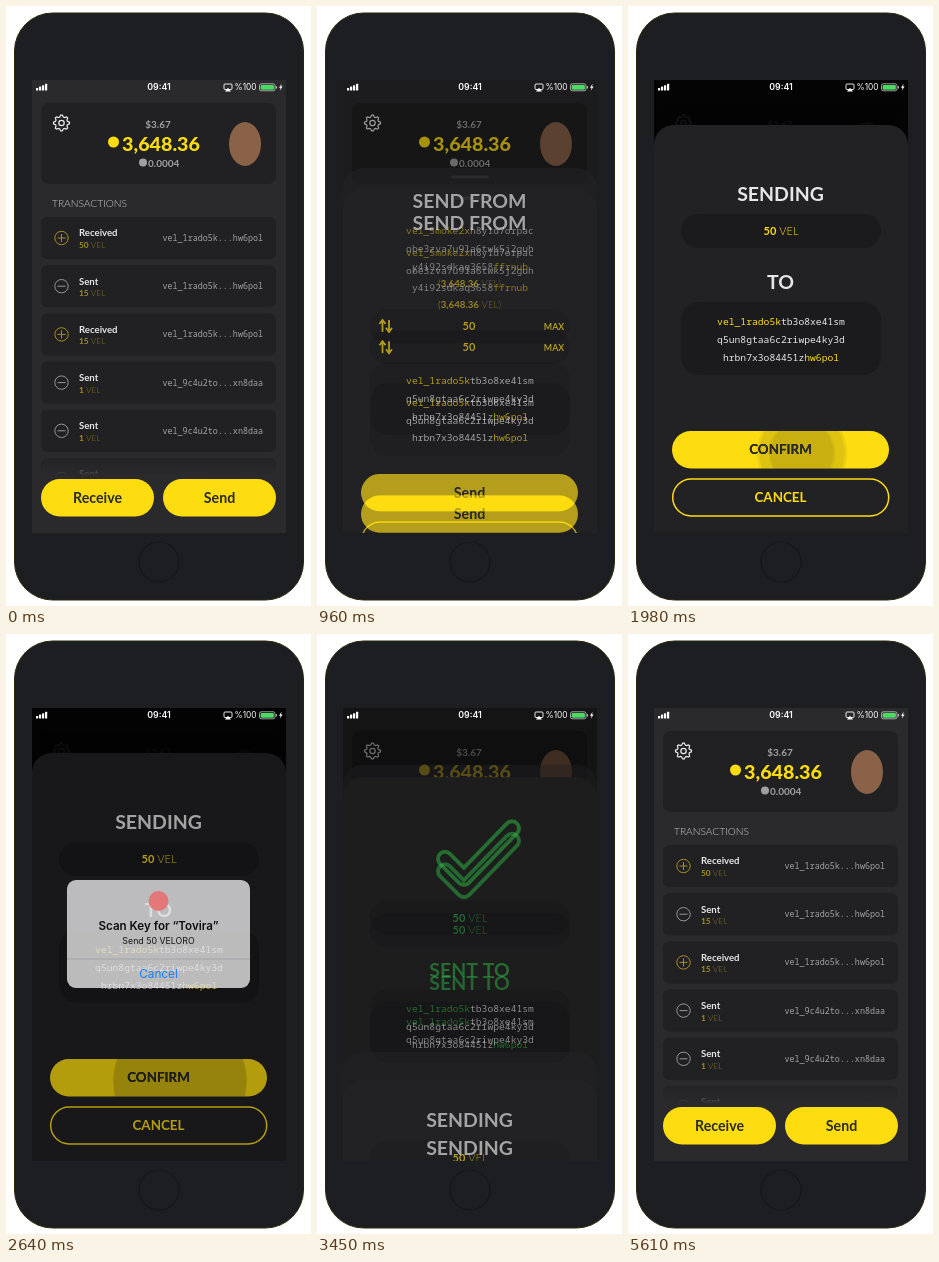
An HTML page with a canvas that plays this animation: 305x600 px, repeating every 5640 ms.

```html
<!DOCTYPE html>
<html lang="en">
<head>
<meta charset="utf-8">
<title>Wallet payment</title>
<style>
  html, body { margin: 0; width: 100%; height: 100%; overflow: hidden; background: #fff; }
  canvas { display: block; width: 305px; height: 600px; }
</style>
</head>
<body>
<canvas id="stage"></canvas>
<script>
const LOOP = 5640, STEP = 30, BLUR = 17, SLIDE = 250, FAST = 205, TRAVEL = 408;
const SEND_IN = 828, CONFIRM_IN = 1450, CONFIRM_OUT = 3250;
const SENT_IN = 3308, SENT_OUT = 4100, RESET = 4860;
const W = 305, H = 600;
const YELLOW = '#fddd10', DIM_YELLOW = '#a48f18', GREEN = '#35b04a', LIGHT = '#e6e6e6';
const BG = '#2a2a2d', CARD = '#212123', SHEET = '#222224', FIELD = '#1b1b1d';
const SANS = 'Lato, "Open Sans", sans-serif';
const MONO = '"Noto Sans Mono", "DejaVu Sans Mono", monospace';
const SYSTEM = 'Inter, Roboto, sans-serif';

const UNIT = 'VEL';
const PAYEE = ['vel_1rado5k', 'tb3o8xe41sm', 'q5un8gtaa6c2riwpe4ky3d', 'hrbn7x3o84451z', 'hw6pol'];
const OWNER = ['vel_5moke2x', 'h8y1d7orpac', 'obe3zva7u9la6twk5j2guh', 'y4i92sdkaq3658', 'ffrnub'];
const SHORT_A = 'vel_1rado5k...hw6pol', SHORT_B = 'vel_9c4u2to...xn8daa';
const HISTORY = [
  ['Sent', 50, SHORT_A], ['Received', 50, SHORT_A], ['Sent', 15, SHORT_A],
  ['Received', 15, SHORT_A], ['Sent', 1, SHORT_B], ['Sent', 1, SHORT_B], ['Sent', 1, SHORT_B]
];

const scale = Math.max(1, window.devicePixelRatio || 1);
const stage = document.getElementById('stage');
stage.width = W * scale;
stage.height = H * scale;
const c = stage.getContext('2d', { willReadFrequently: true });
c.scale(scale, scale);

const clamp = x => Math.min(1, Math.max(0, x));
const ramp = (t, start, length) => clamp((t - start) / length);
const slideIn = (t, start, length = SLIDE) => TRAVEL * (1 - ramp(t, start, length)) ** 3;
const slideOut = (t, start) => TRAVEL * ramp(t, start, SLIDE);

function box(x, y, w, h, r, fill, line, lw = 1.5) {
  c.beginPath();
  c.roundRect(x, y, w, h, r);
  if (fill) { c.fillStyle = fill; c.fill(); }
  if (line) { c.strokeStyle = line; c.lineWidth = lw; c.stroke(); }
}

function disc(x, y, r, fill, line, lw = 1) {
  c.beginPath();
  c.arc(x, y, r, 0, 7);
  if (fill) { c.fillStyle = fill; c.fill(); }
  if (line) { c.strokeStyle = line; c.lineWidth = lw; c.stroke(); }
}

function poly(points, line, lw, fill) {
  c.beginPath();
  points.forEach(([x, y]) => c.lineTo(x, y));
  if (fill) { c.closePath(); c.fillStyle = fill; c.fill(); }
  if (line) { c.strokeStyle = line; c.lineWidth = lw; c.stroke(); }
}

// y is the middle of the capitals
function text(s, x, y, size, color, weight = 400, align = 'center', family = SANS) {
  c.font = `${weight} ${size}px ${family}`;
  c.textAlign = align;
  c.fillStyle = color;
  c.fillText(s, x, y + size * 0.36);
}

// centred line of [string, color, weight] pieces
function runs(parts, x, y, size, family = SANS) {
  const widths = parts.map(([s, , weight = 400]) => {
    c.font = `${weight} ${size}px ${family}`;
    return c.measureText(s).width;
  });
  x -= widths.reduce((a, b) => a + b) / 2;
  parts.forEach(([s, color, weight], i) => {
    text(s, x, y, size, color, weight, 'left', family);
    x += widths[i];
  });
}

function address(lines, y, accent, color) {
  const [head, a, b, d, tail] = lines;
  runs([[head, accent], [a, color]], 153, y, 9.7, MONO);
  runs([[b, color]], 153, y + 17.8, 9.7, MONO);
  runs([[d, color], [tail, accent]], 153, y + 35.6, 9.7, MONO);
}

function ripple(x, y, w, h, cx, cy, r, alpha) {
  c.save();
  c.beginPath();
  c.roundRect(x, y, w, h, h / 2);
  c.clip();
  disc(cx, cy, r, `rgba(20,18,20,${alpha})`);
  c.restore();
}

function tap(t, start, x, y, w, h) {
  const age = t - start;
  if (age < 0 || age > 400) return;
  ripple(x, y, w, h, x + w / 2, y + h / 2, 10 + age * 0.2, 0.18 * (1 - ramp(age, 200, 200)));
}

function shade(alpha) {
  c.fillStyle = `rgba(0,0,0,${alpha})`;
  c.fillRect(26, 74, 254, 453);
}

function gear(x, y) {
  c.beginPath();
  for (let i = 0; i < 32; i++) {
    const a = (i - 0.5) * Math.PI / 16, r = i % 4 < 2 ? 8 : 6.2;
    c.lineTo(x + r * Math.cos(a), y + r * Math.sin(a));
  }
  c.closePath();
  c.strokeStyle = '#eee';
  c.lineWidth = 1.2;
  c.stroke();
  disc(x, y, 2.7, null, '#eee', 1.2);
}

function row([kind, amount, who], y) {
  const plus = kind === 'Received', color = plus ? DIM_YELLOW : '#969696';
  box(35, y, 235, 42, 6, CARD);
  const m = y + 21;
  disc(55.5, m, 6.7, null, color);
  poly([[51.5, m], [59.5, m]], color, 1);
  if (plus) poly([[55.5, m - 4], [55.5, m + 4]], color, 1);
  text(kind, 73, m - 5, 9.6, LIGHT, 700, 'left');
  text(amount, 73, m + 7, 8.4, DIM_YELLOW, 700, 'left');
  text(UNIT, 75 + String(amount).length * 4.9, m + 7, 8.4, '#83731c', 300, 'left');
  text(who, 257, m, 8.4, '#a2a2a2', 400, 'right', MONO);
}

function home(t) {
  const spent = t >= 3500 && t < RESET;
  c.fillStyle = BG;
  c.fillRect(26, 74, 254, 453);
  box(35, 97, 235, 81, 8, CARD);
  gear(55.5, 117);
  text(spent ? '$3.62' : '$3.67', 152, 118, 10, '#a0a0a0', 700);
  disc(107.5, 136, 5.5, YELLOW);
  text(spent ? '3,598.36' : '3,648.36', 155, 137.5, 19.7, YELLOW, 800);
  disc(137, 156.5, 4, '#a0a0a0');
  text('0.0004', 142, 157, 10, '#a0a0a0', 700, 'left');
  c.beginPath();
  c.ellipse(239, 138, 16, 22, 0, 0, 7);
  c.fillStyle = '#8a6248';
  c.fill();
  text('TRANSACTIONS', 46, 197.5, 10.2, '#cfcfcf', 300, 'left');
  HISTORY.slice(spent ? 0 : 1).slice(0, 6).forEach((item, i) => row(item, 211 + i * 48.2));
  const fade = c.createLinearGradient(0, 446, 0, 470);
  fade.addColorStop(0, 'rgba(42,42,45,0)');
  fade.addColorStop(1, BG);
  c.fillStyle = fade;
  c.fillRect(26, 446, 254, 81);
  [['Receive', 35], ['Send', 157]].forEach(([label, x]) => {
    box(x, 473, 113, 37.5, 19, YELLOW);
    text(label, x + 56.5, 491.5, 14.2, '#2a2a2a', 700);
  });
  tap(t, 480, 157, 473, 113, 37.5);
}

function sheet(offset, draw) {
  c.save();
  c.translate(0, offset);
  box(26, 119, 254, 420, [20, 20, 0, 0], SHEET);
  draw();
  c.restore();
}

const pill = (label, size) => {
  box(44, 425, 217, 37.5, 19, YELLOW);
  text(label, 152.5, 443.5, size, '#2a2a2a', 700);
};
const outline = (label, color) => {
  box(44.7, 473, 216, 37, 18.5, null, color);
  text(label, 152.5, 491.5, 13.4, color, 700);
};
const title = (s, y, color = LIGHT) => text(s, 152.5, y, 19.5, color, 700);
const amount = (y, color) => {
  box(53, y - 17, 200, 34, 17, FIELD);
  runs([['50', color, 700], [' ' + UNIT, color, 300]], 153, y, 11);
};

function arrow(x, from, to) {
  const d = Math.sign(to - from) * 4;
  poly([[x, from], [x, to]], YELLOW, 1.8);
  poly([[x - 3, to - d], [x, to], [x + 3, to - d]], YELLOW, 1.8);
}

function sendSheet(t) {
  box(134, 126.5, 38, 3, 1.5, '#39393c');
  title('SEND FROM', 152.5);
  address(OWNER, 182, '#c6ad19', '#b8b8b8');
  runs([['(', DIM_YELLOW], ['3,648.36', '#d2b817', 700], [` ${UNIT})`, DIM_YELLOW, 300]], 152.5, 234.5, 9.7);
  box(53, 260, 200, 34, 17, FIELD);
  arrow(65.5, 283, 271);
  arrow(72, 271, 283);
  text('50', 152, 277, 11, YELLOW, 700);
  text('MAX', 237, 277.5, 8.8, YELLOW, 700);
  box(53, 313, 200, 73, 18, FIELD);
  address(PAYEE, 332, YELLOW, LIGHT);
  pill('Send', 14.2);
  tap(t, 1230, 44, 425, 217, 37.5);
  outline('SCAN QR CODE', YELLOW);
}

function confirmSheet(t) {
  title('SENDING', 187.5);
  amount(225, YELLOW);
  title('TO', 275.5);
  box(53, 296, 200, 73, 18, FIELD);
  address(PAYEE, 315.5, YELLOW, LIGHT);
  pill('CONFIRM', 13.4);
  if (t > 1800) {
    const r = 67 * (1 - Math.exp((1800 - t) / 160));
    const inner = 1 - ramp(t, 2100, 300);
    ripple(44, 425, 217, 37.5, 174, 447, r, 0.18 - 0.05 * inner);
    ripple(44, 425, 217, 37.5, 174, 447, r * 0.74, 0.1 * inner);
    text('CONFIRM', 152.5, 443.5, 13.4, '#2a2a2a', 700);
  }
  outline('CANCEL', YELLOW);
}

function sentSheet() {
  const check = [[128, 213], [147, 232], [195, 182.5]];
  c.lineCap = c.lineJoin = 'round';
  poly(check, GREEN, 18);
  poly(check, SHEET, 10);
  c.lineCap = 'butt';
  c.lineJoin = 'miter';
  amount(272, GREEN);
  title('SENT TO', 324.5, GREEN);
  box(53, 344, 200, 73, 18, FIELD);
  address(PAYEE, 363, GREEN, LIGHT);
  outline('CLOSE', GREEN);
}

function dialog(t) {
  const leave = 1 - ramp(t, 3000, 180);
  const show = ramp(t, 2500, 130) * leave;
  if (!show) return;
  shade(0.3 * show);
  const zoom = 1 + 0.15 * (1 - ramp(t, 2500, 130)) ** 2;
  c.save();
  c.globalAlpha = show;
  c.translate(152.5, 300);
  c.scale(zoom, zoom);
  c.translate(-152.5, -300);
  box(61, 246, 183, 108, 9, 'rgba(240,240,242,0.78)');
  disc(152.5, 267, 10, '#e57576');
  text('Scan Key for “Tovira”', 152.5, 291.5, 11.6, '#080808', 600, 'center', SYSTEM);
  text('Send 50 VELORO', 152.5, 307, 8.8, '#111', 400, 'center', SYSTEM);
  poly([[61, 325], [244, 325]], '#98989b', 0.7);
  text('Cancel', 152.5, 340, 11.8, '#137dff', 400, 'center', SYSTEM);
  c.restore();
}

function statusBar() {
  for (let i = 0; i < 4; i++) box(30 + i * 3, 82 - i * 1.4, 2.2, 2.4 + i * 1.4, 0.5, '#fff');
  text('09:41', 153, 81, 8.8, '#fff', 600, 'center', SYSTEM);
  box(218, 78, 8, 5.5, 1, null, '#fff', 0.9);
  poly([[219, 85.5], [222, 81.8], [225, 85.5]], null, 0, '#fff');
  text('%100', 250.5, 81.2, 8.3, '#fff', 400, 'right', SYSTEM);
  box(253.5, 77.8, 15.5, 7, 1.8, null, '#ddd', 0.7);
  box(254.6, 78.9, 13.3, 4.8, 1, '#4cd964');
  box(269.8, 80, 1, 2.6, 0.5, '#ddd');
  poly([[275.6, 77.8], [273, 81.8], [274.6, 81.8], [273.8, 84.8], [276.6, 80.6], [275, 80.6]], null, 0, '#fff');
}

function phone() {
  c.fillStyle = '#fff';
  c.fillRect(0, 0, W, H);
  box(8.5, 7, 289, 587, 38, '#1c1e22', '#2b260a', 1);
  disc(153, 556, 20, null, '#15171a', 1.2);
}

function scene(t) {
  phone();
  c.save();
  c.beginPath();
  c.rect(26, 74, 254, 453);
  c.clip();
  home(t);
  if (t >= SEND_IN && t < CONFIRM_OUT) {
    shade(0.7 * ramp(t, SEND_IN, SLIDE));
    sheet(slideIn(t, SEND_IN), () => sendSheet(t));
  }
  if (t >= SENT_IN && t < SENT_OUT + SLIDE) {
    shade(0.7 * ramp(t, SENT_IN, FAST) * (1 - ramp(t, SENT_OUT, SLIDE)));
    sheet(slideIn(t, SENT_IN, FAST) + slideOut(t, SENT_OUT), sentSheet);
  }
  if (t >= CONFIRM_IN && t < CONFIRM_OUT + SLIDE) {
    shade(0.7 * ramp(t, CONFIRM_IN, SLIDE) * (1 - ramp(t, CONFIRM_OUT, SLIDE)));
    sheet(slideIn(t, CONFIRM_IN) + slideOut(t, CONFIRM_OUT), () => confirmSheet(t));
  }
  dialog(t);
  statusBar();
  c.restore();
}

function capture(t) {
  scene(t);
  return c.getImageData(0, 0, stage.width, stage.height);
}

// average two moments in linear light, so moving parts leave a bright trail
function blend(t) {
  const before = capture(t - BLUR).data, now = capture(t), px = now.data;
  for (let i = 0; i < px.length; i++) {
    if (px[i] !== before[i]) px[i] = Math.sqrt((px[i] ** 2 + before[i] ** 2) / 2);
  }
  c.putImageData(now, 0, 0);
}

let shown = -1;
function frame() {
  const t = Math.floor(performance.now() % LOOP / STEP) * STEP;
  if (t !== shown) blend(shown = t);
  requestAnimationFrame(frame);
}
frame();
</script>
</body>
</html>
```
